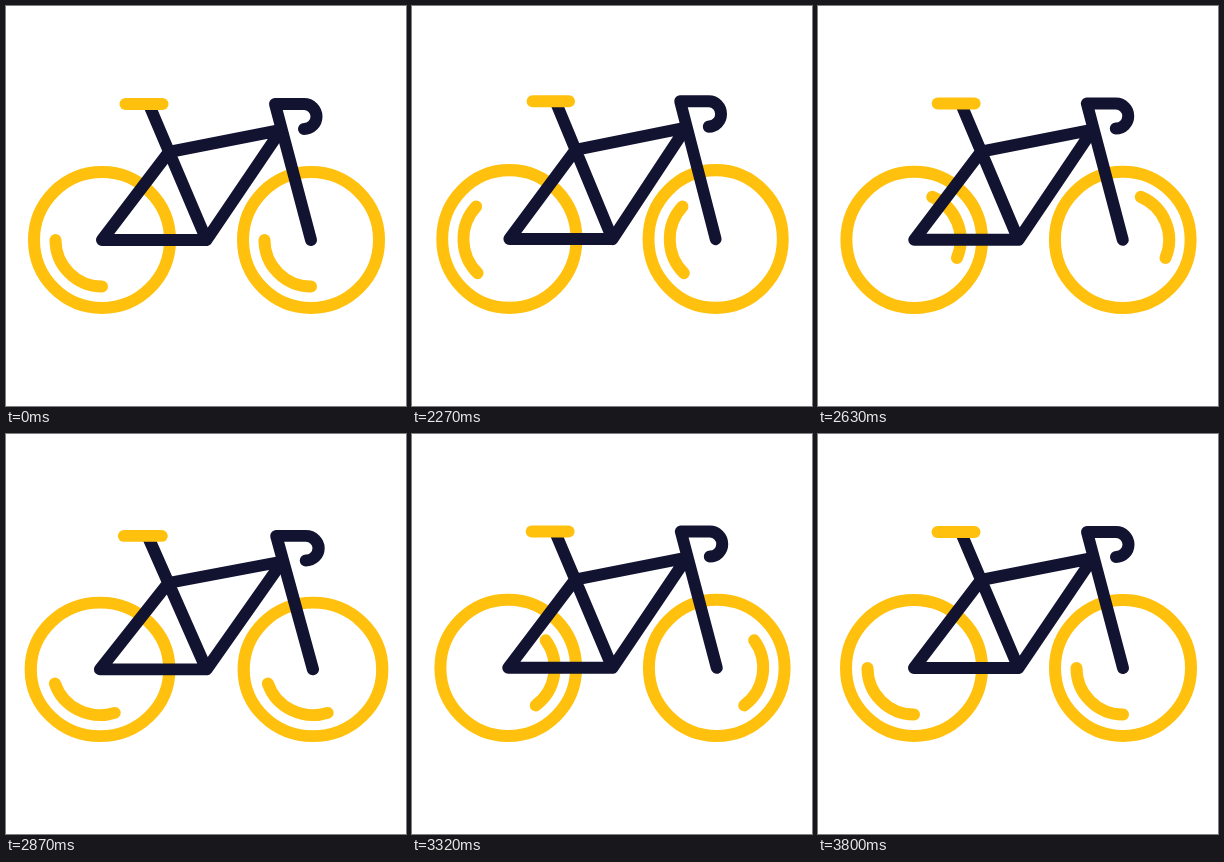
Recreate the animation shown at these times as an HTML page. Size 400 px wide and 400 px high, loop 3.83 s.

```html
<!DOCTYPE html>
<html lang="en">
<head>
<meta charset="utf-8">
<title>Bicycle</title>
<style>
  html, body { margin: 0; width: 100%; height: 100%; overflow: hidden; background: #fff; }
  svg { display: block; width: 100vw; height: 100vh; }
  g { fill: none; stroke-width: 12; stroke-linecap: round; stroke-linejoin: round; }
  .accent { stroke: #ffc10d; }
  .frame { stroke: #121331; }
</style>
</head>
<body>
<svg viewBox="0 0 400 400">
  <defs>
    <g id="wheel">
      <circle r="68"/>
      <path class="shine" d="M-46.5 0A46.5 46.5 0 0 0 0 46.5"/>
    </g>
  </defs>
  <g id="bike">
    <g class="accent">
      <g class="wheel" transform="translate(96 234)">
        <circle r="68"/>
        <path class="shine" d="M-46.5 0A46.5 46.5 0 0 0 0 46.5"/>
      </g>
      <g class="wheel" transform="translate(305 234)">
        <circle r="68"/>
        <path class="shine" d="M-46.5 0A46.5 46.5 0 0 0 0 46.5"/>
      </g>
    </g>
    <g class="frame">
      <path d="M144 101L200.5 234H96L163 146L275 124L200.5 234"/>
      <path d="M305 234L269 98H298A12.5 12.5 0 0 1 298 123"/>
    </g>
    <path class="accent" d="M119.5 98H156.5" stroke-width="12" stroke-linecap="round"/>
  </g>
</svg>
<script>
  const LOOP = 3830, START = 2030, STEP = 30, STEPS = 60;
  const TURN = 720, STRETCH = 0.02;
  // [step, stretch]: positive is tall, negative is wide
  const BOUNCE = [[0, 0], [15, 1], [28, -1], [38, 1], [51, -1], [60, 0]];

  const bike = document.getElementById('bike');
  const shines = document.querySelectorAll('.wheel .shine');
  const ease = x => x * x * (3 - 2 * x);

  function bounceAt(step) {
    const i = Math.max(1, BOUNCE.findIndex(([at]) => at >= step));
    const [t0, v0] = BOUNCE[i - 1], [t1, v1] = BOUNCE[i];
    return v0 + (v1 - v0) * ease((step - t0) / (t1 - t0));
  }

  function draw() {
    const time = performance.now() % LOOP;
    const step = Math.min(STEPS, Math.max(0, Math.floor((time - START) / STEP) + 1));
    const s = STRETCH * bounceAt(step);
    // the wheels stay on the ground while the bike stretches
    bike.setAttribute('transform',
      `translate(200.5 308) scale(${1 - s} ${1 + s}) translate(-200.5 -308)`);
    const angle = TURN * ease(step / STEPS);
    shines.forEach(el => el.setAttribute('transform', `rotate(${angle})`));
    requestAnimationFrame(draw);
  }
  draw();
</script>
</body>
</html>
```
